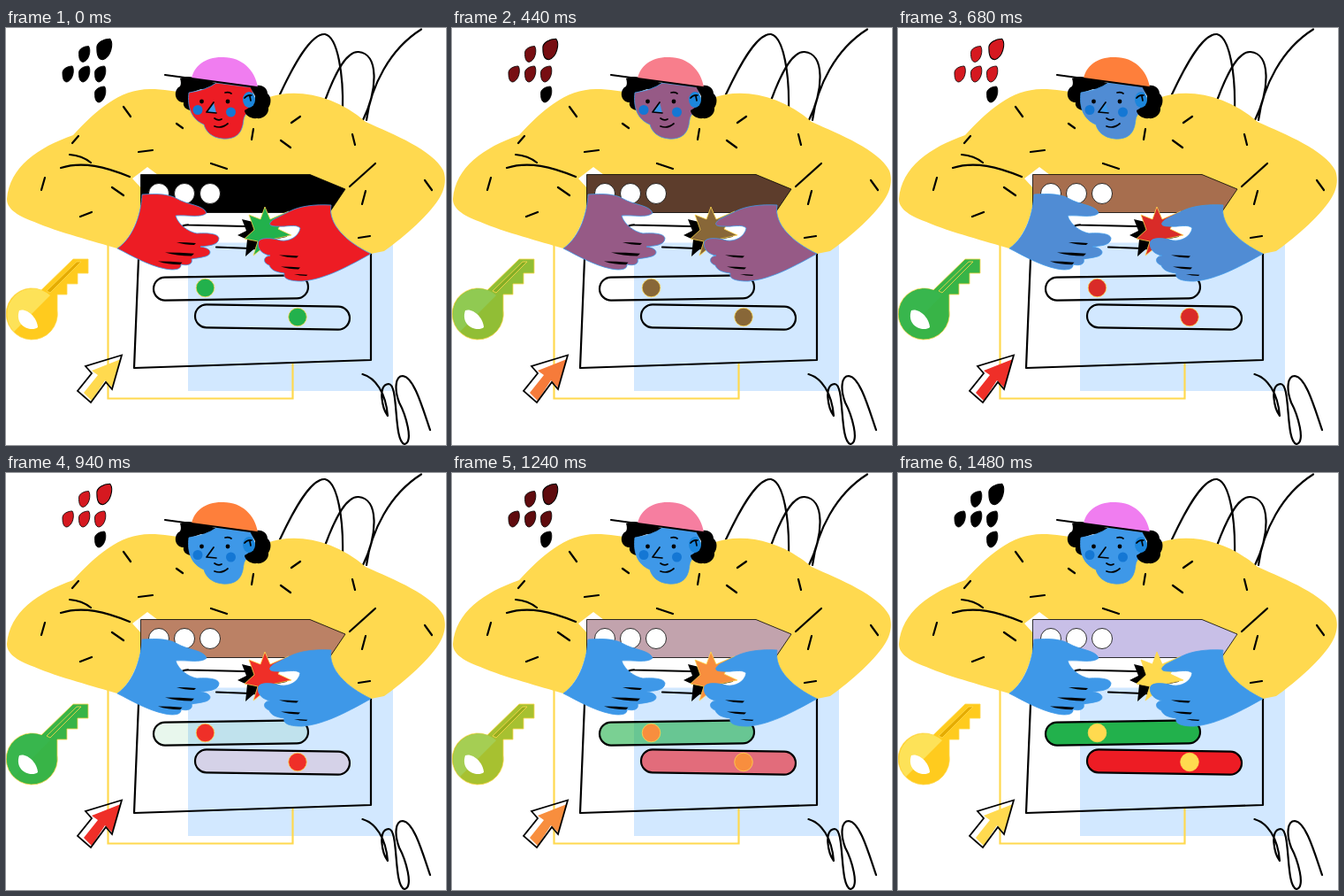
Recreate the animation shown at these times as an HTML page. Size 498 by 471 pixels, loop 1680 ms.

```html
<!DOCTYPE html>
<html lang="en">
<head>
<meta charset="utf-8">
<title>Colour shift</title>
<style>
html, body { margin: 0; width: 100%; height: 100%; overflow: hidden; background: #fff; }
svg { display: block; width: 100vw; height: 100vh; }
.ink { fill: none; stroke: #000; stroke-width: 2.2; stroke-linecap: round; stroke-linejoin: round; }
.fine { stroke-width: 1.7; }
.edge { stroke: #3e98e8; stroke-width: .8; }
.gold { stroke: #ffd94f; stroke-width: .8; }
.dark { stroke: #000; stroke-width: .8; }
</style>
</head>
<body>
<svg viewBox="0 0 498 471">
  <defs>
    <path id="drop" d="M-6 0C-7-6 0-9 5-9C8-5 6 7-1 9C-5 9-6 4-6 0Z"/>
    <path id="crease" d="M0 0Q11 0 22 1L20 3Q9 3 0 0Z"/>
  </defs>

  <!-- backdrop -->
  <path fill="#d2e8ff" d="M206 242.5H438V410H206Z"/>
  <path fill="none" stroke="#ffd94f" stroke-width="2.2" d="M115.500 245V418.500H324.500V378"/>
  <g class="ink">
    <path d="M310 75C326 41 345 6 361 7C376 10 382 55 381 92"/>
    <path d="M361 82C371 55 384 26 399 27C422 29 421 69 404 104M408 104C413 66 434 24 470 1.500"/>
    <path d="M403.500 391C418 395 430 412 432 438C426 430 420 403 433 402C445 402 438 466 451 470C462 468 452 436 445 423C439 407 441 393 449 393C462 394 472 431 480 454"/>
  </g>

  <!-- panel -->
  <path class="ink" d="M150 261L145 384L413 375V253"/>
  <path class="ink" d="M196 229Q198 222 207 222.500L290 224.500M238 247.500L290 249.500M303 238L317 235"/>
  <rect class="ink" data-c="go" x="167" y="280.500" width="175" height="26" rx="13" transform="rotate(-.8 254 293.500)"/>
  <rect class="ink" data-c="stop" x="214" y="313.500" width="175" height="26" rx="13" transform="rotate(.9 301 326.500)"/>
  <circle class="gold" data-c="star" cx="225.500" cy="293.500" r="10.300"/>
  <circle class="gold" data-c="star" cx="330" cy="326.500" r="10.300"/>

  <!-- sweater -->
  <path fill="#ffd94f" d="M1 193C4 157 36 135 76 121C101 94 128 69 163 69C178 69 193 71 208 76L295 79C329 67 372 76 407 106C440 121 482 137 495 161C499 172 496 184 490 193C477 214 444 241 428 252L413 255C386 242 364 222 368 200L384 182L344 172H180L160 157L143 170L155 183C153 207 145 235 126 249C100 241 60 231 32 219C10 211 1 203 1 193Z"/>
  <path class="ink" d="M62 158C87 150 113 157 140 168M72 143Q86 144 96 152M418 153L389 179"/>
  <path class="ink" d="M133 89l8 11M193 108l7 5M75 130l7-8M150 140l16-2M40 183l4-14M84 213l13-5M120 180l13 9M232 153l18 6M280 114l-2 12M311 127l11 8M323 107l10-7M392 120l3 12M407 184l-4 15M474 172l8 11M399 237l13-2"/>

  <!-- header bar -->
  <path class="dark" data-c="bar" d="M152.500 165.500H344L384 182L366 208.500H152.500Z"/>
  <g fill="#fff" class="dark">
    <circle cx="173" cy="187" r="11.500"/><circle cx="202" cy="187" r="11.500"/><circle cx="231" cy="187" r="11.500"/>
  </g>

  <!-- star and hands -->
  <path d="M267 216L272 229L262 234L273 239L271 258L286 245L292 222Z"/>
  <path class="gold" data-c="star" d="M293 202L299 216L320 207L308 227L323 234L304 238L280 257L285 241L270 238L281 228L275 211L288 216Z"/>
  <path class="edge" data-c="skin" d="M154 188C170 187 184 187 194 193C206 200 224 200 227 209C221 215 205 211 192 212C195 222 206 230 216 232C232 231 241 233 241 238C240 246 228 246 220 247C234 249 233 256 226 258C219 260 214 260 210 261C212 267 205 269 198 267C199 273 190 274 180 272C160 268 142 257 126 249C146 235 153 207 154 188Z"/>
  <path class="edge" data-c="skin" d="M368 200C349 199 333 201 321 207L303 216C295 222 299 224 307 224C318 225 328 221 333 226C331 236 321 241 311 240C301 237 287 236 285.500 242C284 250 291 256 299 257C291 258 290 265 298 268C300 274 307 276 315 277C313 284 323 286 335 286C362 284 391 267 413 255C386 242 364 222 368 200Z"/>
  <use href="#crease" x="193" y="242"/>
  <use href="#crease" transform="translate(180 253.500) scale(1.500 1.300)"/>
  <use href="#crease" transform="translate(172 263.500) scale(1.250)"/>
  <use href="#crease" x="309" y="256.500"/>
  <use href="#crease" x="311" y="269.500"/>
  <use href="#crease" transform="translate(326 278) scale(.7)"/>

  <!-- head -->
  <path d="M197 57C206 52 218 57 237 62V68Q227 70 221 69L209 73V93C203 92 200 88 201 84C192 84 189 73 195 67C199 66 198 60 197 57Z"/>
  <path class="edge" data-c="skin" d="M207 73Q227 70 238 62L278 67L283 90L271 98C268 102 269 109 267 113C264 123 254 126 245 125C233 124 226 117 224 109C209 103 205 88 207 73Z"/>
  <path d="M276 66L284 65C291 64 296 69 296 74C301 78 300 86 297 90C298 98 290 103 284 102C277 103 270 98 270 93C276 90 283 84 282 77Z"/>
  <ellipse cx="275" cy="81" rx="7" ry="9" fill="#1c86dc"/>
  <path class="ink fine" d="M270 79Q273 75 278 76M276 77L277 82"/>
  <circle cx="217" cy="92.500" r="5.500" fill="#1477d4"/>
  <circle cx="254.500" cy="95" r="5.500" fill="#1477d4"/>
  <path fill="#3e98e8" d="M235 84L227 96H238Z"/>
  <path class="ink fine" d="M235 84L227 95L238 96M248 73Q252 72 255 74M236 102Q240 105 244 103M236 111Q244 114 251 108"/>
  <circle cx="221.500" cy="83" r="2.400"/><circle cx="251" cy="83" r="2.400"/>
  <path data-c="cap" d="M210 57C213 43 225 33 244 33C266 32 282 47 285 67Z"/>
  <path class="ink" d="M180 53L284 67"/>

  <!-- drops -->
  <g class="dark">
    <use href="#drop" data-c="drop" transform="translate(111 24) scale(1.350 1.300)"/>
    <use href="#drop" data-c="drop" x="88.500" y="29.500"/>
    <use href="#drop" data-c="drop" x="70" y="52"/>
    <use href="#drop" data-c="drop" x="88.500" y="52"/>
    <use href="#drop" data-c="drop" x="106.500" y="52"/>
    <use href="#drop" x="106.500" y="75"/>
  </g>

  <!-- key -->
  <path class="gold" data-c="key" d="M40 296L76 261H93V277H81V289H69V301H58V319A29 29 0 1 1 40 296Z"/>
  <path data-c="shine" d="M9 343A29 29 0 0 1 40 296L46 299L50 302Z"/>
  <path data-c="groove" class="gold" d="M46 297L80 264H85L50 299Z"/>
  <path fill="#fff" d="M15 319C23 316 35 326 36 338C29 344 9 337 15 319Z"/>

  <!-- pointer -->
  <path data-c="arrow" d="M130 374L97 387L104 392L88 412L97 421L112 398L120 406Z"/>
  <path class="ink" style="stroke-width:1.800;stroke-linejoin:miter" d="M131 369.500L90 382L97 390L81 410L96 423L113 400L120 408Z"/>
</svg>
<script>
const RED = [237, 28, 36], GREEN = [34, 177, 76], BLUE = [62, 152, 232];
const YELLOW = [255, 218, 79], PINK = [240, 125, 240], BLACK = [0, 0, 0];
const ORANGE = [255, 127, 39], BROWN = [185, 122, 87], LILAC = [200, 191, 231];
const AMBER = [255, 203, 30], PALE = [253, 226, 88], OCHRE = [229, 172, 0];
const clear = c => [...c, 0];

// start, middle and end colour; the end defaults to the start
const palette = {
  skin: [RED, BLUE, BLUE],
  cap: [PINK, ORANGE],
  bar: [BLACK, BROWN, LILAC],
  star: [GREEN, RED, YELLOW],
  arrow: [YELLOW, RED],
  drop: [BLACK, RED],
  key: [AMBER, GREEN],
  shine: [PALE, GREEN],
  groove: [OCHRE, GREEN],
  go: [clear(GREEN), clear(GREEN), GREEN],
  stop: [clear(RED), clear(RED), RED]
};

const HOLD = 200, STEP = 60, STEPS = 10;
const HALF = HOLD + STEP * (STEPS - 1), LOOP = 2 * HALF + HOLD;
const parts = [...document.querySelectorAll('[data-c]')];

// stepped fade from 0 to 1
const fade = t => t < HOLD ? 0 : Math.min(1, (Math.floor((t - HOLD) / STEP) + 1) / STEPS);

function mix(from, to, k) {
  const [r, g, b, a] = [0, 1, 2, 3].map(n => {
    const u = from[n] ?? 1, v = to[n] ?? 1;
    return u + (v - u) * k;
  });
  return `rgba(${Math.round(r)},${Math.round(g)},${Math.round(b)},${a.toFixed(2)})`;
}

function draw(ms) {
  const t = ms % LOOP, late = t >= HALF;
  const k = fade(late ? t - HALF : t);
  for (const el of parts) {
    const [start, middle, end = start] = palette[el.dataset.c];
    el.style.fill = late ? mix(middle, end, k) : mix(start, middle, k);
  }
}

const begin = performance.now();
function tick() {
  draw(performance.now() - begin);
  requestAnimationFrame(tick);
}
tick();
</script>
</body>
</html>
```
